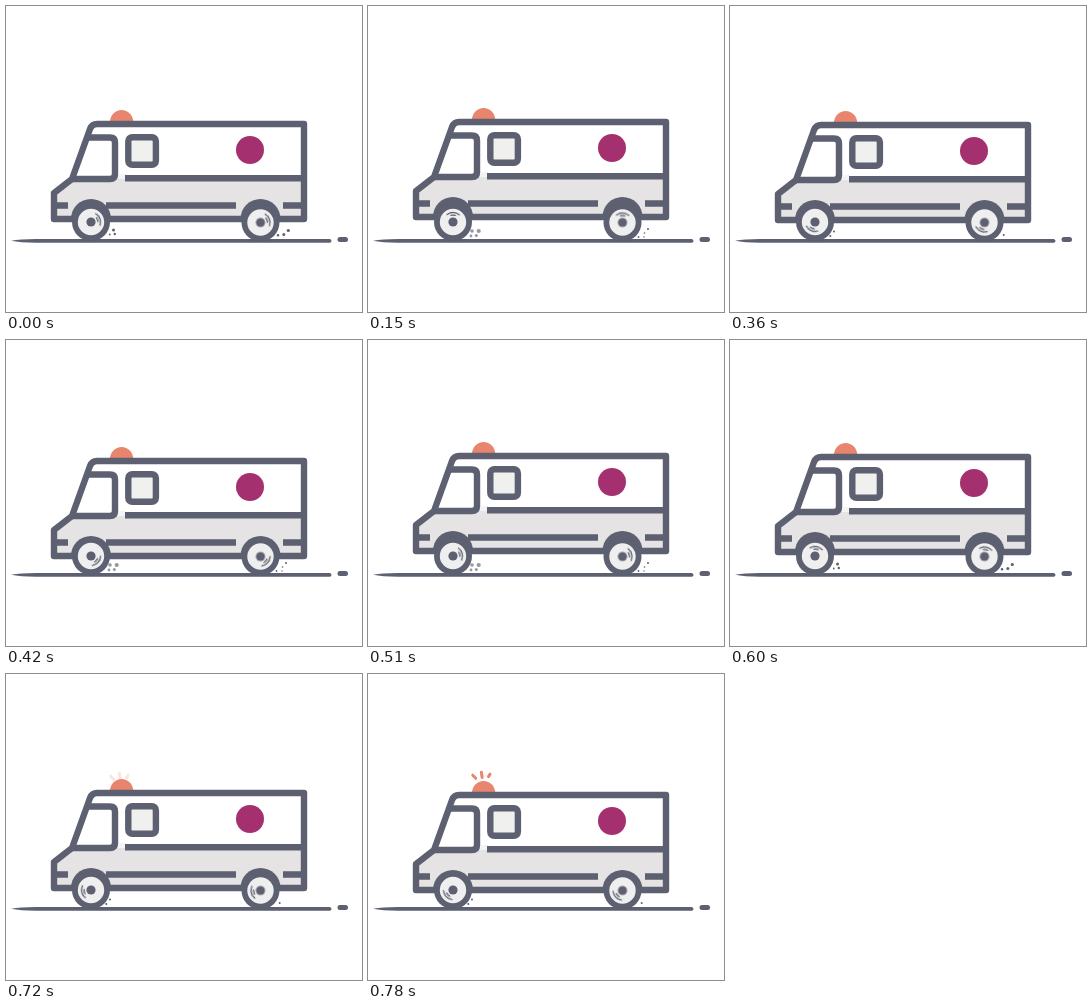
These frames come from a looping animation (356 by 306 pixels, 0.81 s). An HTML page:

```html
<!DOCTYPE html>
<html lang="en">
<head>
<meta charset="utf-8">
<style>
  html, body { margin: 0; width: 100%; height: 100%; overflow: hidden; background: #fff; }
  svg { display: block; width: 100vw; height: 100vh; }

  .ink { fill: #5c6070; }
  .line { fill: none; stroke: #5c6070; stroke-width: 6.4; stroke-linejoin: round; }
  .glass { fill: #f0f0ef; }
  .panel { fill: #e5e3e3; }
  .lamp { fill: #e8856f; }
  .rays { stroke: #e8856f; stroke-width: 3; stroke-linecap: round; }
  .shine { fill: none; stroke: #5c6070; stroke-width: 1.3; stroke-linecap: round; }

  .body, .spin, .rays, .dust { animation: 810ms linear infinite; }
  .body { animation-name: bob; animation-timing-function: ease-in-out; }
  .spin { animation-name: spin; }
  .rays { animation-name: flash; }
  .dust { animation-timing-function: step-end; }
  .near { animation-name: near; }
  .mid { animation-name: mid; }
  .far { animation-name: far; }

  @keyframes bob {
    0%, 100% { transform: translateY(2px); }
    7.41%, 51.85%, 96.3% { transform: translateY(5px); }
    18.52%, 62.96% { transform: translateY(0); }
    29.63%, 37.04%, 74.07%, 81.48% { transform: translateY(1px); }
    44.44%, 88.89% { transform: translateY(3px); }
  }
  @keyframes spin {
    0% { transform: rotate(25deg); }
    18.52% { transform: rotate(-180deg); }
    29.63% { transform: rotate(-270deg); }
    44.44% { transform: rotate(-405deg); }
    62.96% { transform: rotate(-540deg); }
    81.48% { transform: rotate(-630deg); }
    96.3% { transform: rotate(-690deg); }
    100% { transform: rotate(-695deg); }
  }
  @keyframes flash {
    0%, 24%, 38.5%, 88%, 99.9%, 100% { opacity: 0; transform: translateY(4px); }
    25.9%, 34%, 92.6%, 98% { opacity: 1; transform: translateY(0); }
  }
  @keyframes near {
    0%, 51.85% { opacity: 0; }
    25.93%, 88.89% { opacity: 1; }
  }
  @keyframes mid {
    0%, 25.93%, 70.37% { opacity: 0; }
    11.11%, 51.85% { opacity: 1; }
  }
  @keyframes far {
    0%, 70.37% { opacity: 1; }
    11.11%, 88.89% { opacity: 0; }
  }
</style>
</head>
<body>
<svg viewBox="0 0 356 306" preserveAspectRatio="none">
  <defs>
    <g id="wheel">
      <circle class="ink" r="19"/>
      <circle r="13.2" fill="#f0efef"/>
      <g class="spin">
        <path class="shine" d="M7.3-6.1A9.5 9.5 0 0 1 7.3 6.1"/>
        <path class="shine" d="M6.6-2.2A7 7 0 0 1 6.6 2.2"/>
      </g>
      <circle class="ink" r="4.6"/>
    </g>
    <path id="arch" class="ink" d="M-20 3V0A20 20 0 0 1 20 0V3Z"/>
  </defs>

  <path class="ink" d="M5 234.7Q14 232.9 30 232.9H324Q327 234.9 324 236.7H30Q14 236.6 5 234.7Z"/>
  <rect class="ink" x="331.5" y="231" width="10.5" height="5" rx="2.5"/>

  <g class="body">
    <g class="rays">
      <path d="M104.7 96.2L107.8 99.3M113.4 93.3L114.1 98.4M122 95.2L120.5 97.6"/>
    </g>
    <path class="lamp" d="M104 114A11.6 12 0 0 1 127.2 114Z"/>
    <path fill="#fff" d="M48 211V185L66 171L84 121Q86 116 91 116H298V211Z"/>
    <path class="panel" d="M48 211V185L66 171H298V211Z"/>
    <rect x="112" y="166" width="8" height="5" fill="#f5f4f4"/>
    <path class="line" d="M119 170.3H298M48 197.5H62M100 197.5H230M277 197.5H298"/>
    <path class="line" d="M82 129.5H104Q109 129.5 109 134.5V166Q109 171 104 171H66"/>
    <rect class="line glass" x="122.3" y="129.2" width="27.6" height="27.6" rx="4" style="fill:#f0f0ef"/>
    <path class="line" d="M48 211V185L66 171L84 121Q86 116 91 116H298V211Z"/>
    <use href="#arch" x="85" y="211"/>
    <use href="#arch" x="254.5" y="211"/>
    <circle cx="244" cy="142" r="14" fill="#a5306f"/>
  </g>

  <use href="#wheel" x="85" y="216"/>
  <use href="#wheel" x="254.5" y="216.5"/>

  <g class="ink">
    <g class="dust near">
      <circle cx="104" cy="225.5" r="1"/>
      <circle cx="100.3" cy="230" r="1"/>
      <circle cx="273.7" cy="229" r="1"/>
    </g>
    <g class="dust mid">
      <g opacity=".65">
        <circle cx="104" cy="225" r="1.8"/>
        <circle cx="110.7" cy="225" r="2.1"/>
        <circle cx="103" cy="230" r="1.4"/>
        <circle cx="108.3" cy="229.5" r="1.5"/>
      </g>
      <circle cx="280" cy="223" r="1"/>
      <circle cx="276.5" cy="227" r=".8"/>
      <circle cx="270.5" cy="231" r=".9"/>
      <circle cx="276" cy="231" r=".7"/>
    </g>
    <g class="dust far">
      <circle cx="107.5" cy="224" r="1.5"/>
      <circle cx="108.8" cy="228" r="1.2"/>
      <circle cx="103.8" cy="228.5" r=".9"/>
      <circle cx="282.3" cy="224.5" r="1.6"/>
      <circle cx="277.8" cy="228.5" r="1.5"/>
      <circle cx="272" cy="229.3" r="1.2"/>
    </g>
  </g>
</svg>
</body>
</html>
```
